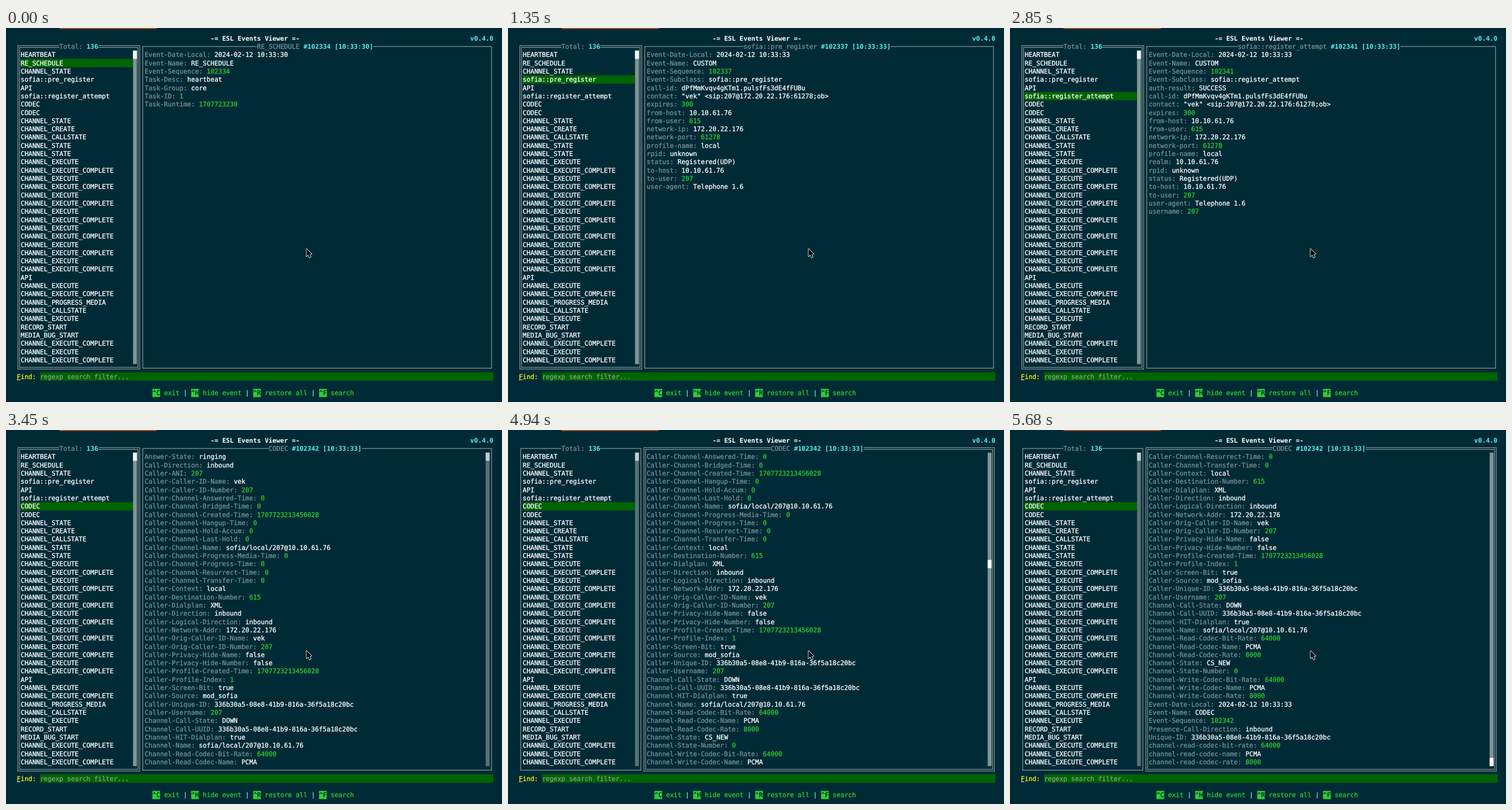
Animation, 862 px wide and 649 px high, one loop 8 s. Source, as an HTML page with a canvas:

```html
<!DOCTYPE html>
<html lang="en">
<head>
<meta charset="utf-8">
<title>ESL Events Viewer</title>
<style>
html, body { margin: 0; width: 100%; height: 100%; overflow: hidden; background: #002b36; }
canvas { display: block; width: 862px; height: 649px; }
</style>
</head>
<body>
<canvas id="stage" width="862" height="649"></canvas>
<script>
const ctx = document.getElementById('stage').getContext('2d');

// Terminal grid
const CW = 6.735, RH = 14.315, X0 = 5.25, Y0 = 39.3;
const ROWS = 38, LOOP = 8000;
const colX = c => X0 + c * CW;
const rowY = r => Y0 + r * RH;

const C = {
  bg: '#002b36', line: '#839496', label: '#7b8e94', white: '#ffffff',
  green: '#32cd32', bar: '#006400', cyan: '#55f0f0', yellow: '#f4f400',
  hint: '#839c88', track: '#5a7077', thumb: '#c4cccd', orange: '#d2511c'
};

const USER = '207', NAME = 'vek', DEST = '615', HOST = '10.10.61.76', IP = '172.20.22.176';
const UUID = '336b30a5-08e8-41b9-816a-36f5a18c20bc';
const CREATED = '1707723213456028';
const DATE = '2024-02-12 10:33:33';
const lines = text => text.trim().split('\n');

const pair = ['CHANNEL_EXECUTE', 'CHANNEL_EXECUTE_COMPLETE'];
const list = [
  ...lines(`
HEARTBEAT
RE_SCHEDULE
CHANNEL_STATE
sofia::pre_register
API
sofia::register_attempt
CODEC
CODEC
CHANNEL_STATE
CHANNEL_CREATE
CHANNEL_CALLSTATE
CHANNEL_STATE
CHANNEL_STATE`),
  ...Array(7).fill(pair).flat(), 'API', ...pair,
  'CHANNEL_PROGRESS_MEDIA', 'CHANNEL_CALLSTATE', 'CHANNEL_EXECUTE',
  'RECORD_START', 'MEDIA_BUG_START', 'CHANNEL_EXECUTE_COMPLETE', ...pair
];

const register = `from-host: ${HOST}
from-user: ${DEST}
network-ip: ${IP}
network-port: 61278
profile-name: local`;
const contact = `call-id: dPfMmKvqv4gKTm1.pulsfFs3dE4fFUBu
contact: "${NAME}" <sip:${USER}@${IP}:61278;ob>
expires: 300`;
const outcome = `rpid: unknown
status: Registered(UDP)
to-host: ${HOST}
to-user: ${USER}
user-agent: Telephone 1.6`;

const event = (at, row, seq, time, text) =>
  ({ at, row, id: `#${seq} [${time}]`, fields: lines(text) });

const events = [
  event(0, 1, 102334, '10:33:30', `
Event-Date-Local: 2024-02-12 10:33:30
Event-Name: RE_SCHEDULE
Event-Sequence: 102334
Task-Desc: heartbeat
Task-Group: core
Task-ID: 1
Task-Runtime: 1707723230`),
  event(600, 2, 102336, '10:33:33', `
Answer-State: ringing
Call-Direction: inbound
Channel-Call-State: DOWN
Channel-Call-UUID: ${UUID}
Channel-HIT-Dialplan: true
Channel-Name: sofia/local/${USER}@${HOST}
Channel-State: CS_NEW
Channel-State-Number: 0
Event-Date-Local: ${DATE}
Event-Name: CHANNEL_STATE
Event-Sequence: 102336
Presence-Call-Direction: inbound
Unique-ID: ${UUID}`),
  event(1350, 3, 102337, '10:33:33', `
Event-Date-Local: ${DATE}
Event-Name: CUSTOM
Event-Sequence: 102337
Event-Subclass: sofia::pre_register
${contact}
${register}
${outcome}`),
  event(2250, 4, 102340, '10:33:33', `
API-Command: hiredis_raw
API-Command-Argument: default get id::${USER}
Event-Date-Local: ${DATE}
Event-Name: API
Event-Sequence: 102340`),
  event(2850, 5, 102341, '10:33:33', `
Event-Date-Local: ${DATE}
Event-Name: CUSTOM
Event-Sequence: 102341
Event-Subclass: sofia::register_attempt
auth-result: SUCCESS
${contact}
${register}
realm: ${HOST}
${outcome}
username: ${USER}`),
  event(3450, 6, 102342, '10:33:33', `
Answer-State: ringing
Call-Direction: inbound
Caller-ANI: ${USER}
Caller-Caller-ID-Name: ${NAME}
Caller-Caller-ID-Number: ${USER}
Caller-Channel-Answered-Time: 0
Caller-Channel-Bridged-Time: 0
Caller-Channel-Created-Time: ${CREATED}
Caller-Channel-Hangup-Time: 0
Caller-Channel-Hold-Accum: 0
Caller-Channel-Last-Hold: 0
Caller-Channel-Name: sofia/local/${USER}@${HOST}
Caller-Channel-Progress-Media-Time: 0
Caller-Channel-Progress-Time: 0
Caller-Channel-Resurrect-Time: 0
Caller-Channel-Transfer-Time: 0
Caller-Context: local
Caller-Destination-Number: ${DEST}
Caller-Dialplan: XML
Caller-Direction: inbound
Caller-Logical-Direction: inbound
Caller-Network-Addr: ${IP}
Caller-Orig-Caller-ID-Name: ${NAME}
Caller-Orig-Caller-ID-Number: ${USER}
Caller-Privacy-Hide-Name: false
Caller-Privacy-Hide-Number: false
Caller-Profile-Created-Time: ${CREATED}
Caller-Profile-Index: 1
Caller-Screen-Bit: true
Caller-Source: mod_sofia
Caller-Unique-ID: ${UUID}
Caller-Username: ${USER}
Channel-Call-State: DOWN
Channel-Call-UUID: ${UUID}
Channel-HIT-Dialplan: true
Channel-Name: sofia/local/${USER}@${HOST}
Channel-Read-Codec-Bit-Rate: 64000
Channel-Read-Codec-Name: PCMA
Channel-Read-Codec-Rate: 8000
Channel-State: CS_NEW
Channel-State-Number: 0
Channel-Write-Codec-Bit-Rate: 64000
Channel-Write-Codec-Name: PCMA
Channel-Write-Codec-Rate: 8000
Event-Date-Local: ${DATE}
Event-Name: CODEC
Event-Sequence: 102342
Presence-Call-Direction: inbound
Unique-ID: ${UUID}
channel-read-codec-bit-rate: 64000
channel-read-codec-name: PCMA
channel-read-codec-rate: 8000`)
];

const FOCUS = 4640;
const scrollTimes = [4790, 4940, 5090, 5240, 5380, 5530, 5680];

function scrollAt(t) {
  if (t < FOCUS) return 0;
  const steps = scrollTimes.filter(s => t >= s).length;
  return Math.round(2 + 12 * steps / scrollTimes.length);
}

function rect(x, y, w, h, color) {
  ctx.fillStyle = color;
  ctx.fillRect(x, y, w, h);
}

function cells(c, r, w, h, color) {
  rect(colX(c), rowY(r), w * CW, h * RH, color);
}

// The thin outline gives the slightly heavy strokes of a smoothed terminal font
function text(s, c, r, color, bold) {
  const x = colX(c), y = rowY(r) + 11;
  ctx.font = (bold ? 'bold ' : '') + '11.187px "DejaVu Sans Mono", monospace';
  ctx.fillStyle = ctx.strokeStyle = color;
  ctx.fillText(s, x, y);
  if (bold) return;
  ctx.lineWidth = .3;
  ctx.strokeText(s, x, y);
}

// Frame through the cell centres, leaving a gap in the top edge for the title
function panel(c1, c2, double, name, id) {
  const len = name.length + 1 + id.length;
  const start = Math.floor((c1 + c2 + 1) / 2) - Math.floor(len / 2);
  const x1 = colX(c1 + .5), x2 = colX(c2 + .5);
  const y1 = rowY(-.5), y2 = rowY(ROWS + .5);
  ctx.strokeStyle = C.line;
  ctx.lineWidth = 1.25;
  for (const d of double ? [-1.45, 1.45] : [0]) {
    ctx.beginPath();
    ctx.moveTo(colX(start), y1 - d);
    ctx.lineTo(x1 - d, y1 - d);
    ctx.lineTo(x1 - d, y2 + d);
    ctx.lineTo(x2 + d, y2 + d);
    ctx.lineTo(x2 + d, y1 - d);
    ctx.lineTo(colX(start + len), y1 - d);
    ctx.stroke();
  }
  text(name, start, -1, C.label);
  text(id, start + name.length + 1, -1, C.cyan, true);
}

function scrollbar(c, pos, focused) {
  cells(c, 0, 1, ROWS, focused ? C.line : C.track);
  cells(c, pos, 1, 1, focused ? C.white : C.thumb);
}

function field(s, r) {
  const cut = s.indexOf(': ') + 2, value = s.slice(cut);
  text(s.slice(0, cut), 35, r, C.label);
  text(value, 35 + cut, r, /^\d+$/.test(value) ? C.green : C.white);
}

function footer() {
  const keys = [['^C', 'exit', 37], ['^H', 'hide event', 47], ['^R', 'restore all', 63], ['^F', 'search', 80]];
  keys.forEach(([key, label, c], i) => {
    cells(c, 41, 2, 1, C.green);
    text(key, c, 41, C.bg);
    text(label, c + 3, 41, C.green);
    if (i) text('|', c - 2, 41, C.cyan, true);
  });
}

function pointer() {
  ctx.beginPath();
  [[522, 383], [522, 396], [525, 393.2], [527.2, 398], [529.4, 397], [527.3, 392.4], [531, 392]]
    .forEach(([x, y]) => ctx.lineTo(x + .3, y + .3));
  ctx.closePath();
  ctx.lineWidth = 1.6;
  ctx.lineJoin = 'round';
  ctx.strokeStyle = '#fff';
  ctx.stroke();
  ctx.fillStyle = '#000';
  ctx.fill();
  ctx.lineJoin = 'miter';
}

function draw(t) {
  const now = events.filter(e => t >= e.at).pop();
  const focusRight = t >= FOCUS;
  const top = scrollAt(t);
  const extra = now.fields.length - ROWS;

  rect(0, 0, 862, 649, C.bg);
  rect(93, 0, 169, 1.5, C.orange);

  text('-= ESL Events Viewer =-', 52, -2, C.white, true);
  text('v0.4.0', 119, -2, C.cyan, true);

  panel(2, 33, !focusRight, 'Total:', '136');
  cells(3, now.row, 29, 1, C.bar);
  list.forEach((s, r) => text(s, 3, r, C.white));
  scrollbar(32, 0, !focusRight);

  panel(34, 124, focusRight, list[now.row], now.id);
  now.fields.slice(top, top + ROWS).forEach(field);
  if (extra > 0) scrollbar(123, Math.floor(top / extra * (ROWS - 1)), focusRight);

  text('Find:', 2, 39, C.yellow);
  rect(19, Math.round(rowY(39) + 12.5), 6, 1, C.white);
  cells(8, 39, 117, 1, C.bar);
  text('regexp search filter...', 8, 39, C.hint);
  footer();
  pointer();
}

ctx.textRendering = 'geometricPrecision';
// An imperceptible skew lets glyphs sit on fractional rows
ctx.setTransform(1, 1e-5, 0, 1, 0, 0);
const begin = performance.now();
function tick() {
  draw((performance.now() - begin) % LOOP);
  requestAnimationFrame(tick);
}
tick();
</script>
</body>
</html>
```
